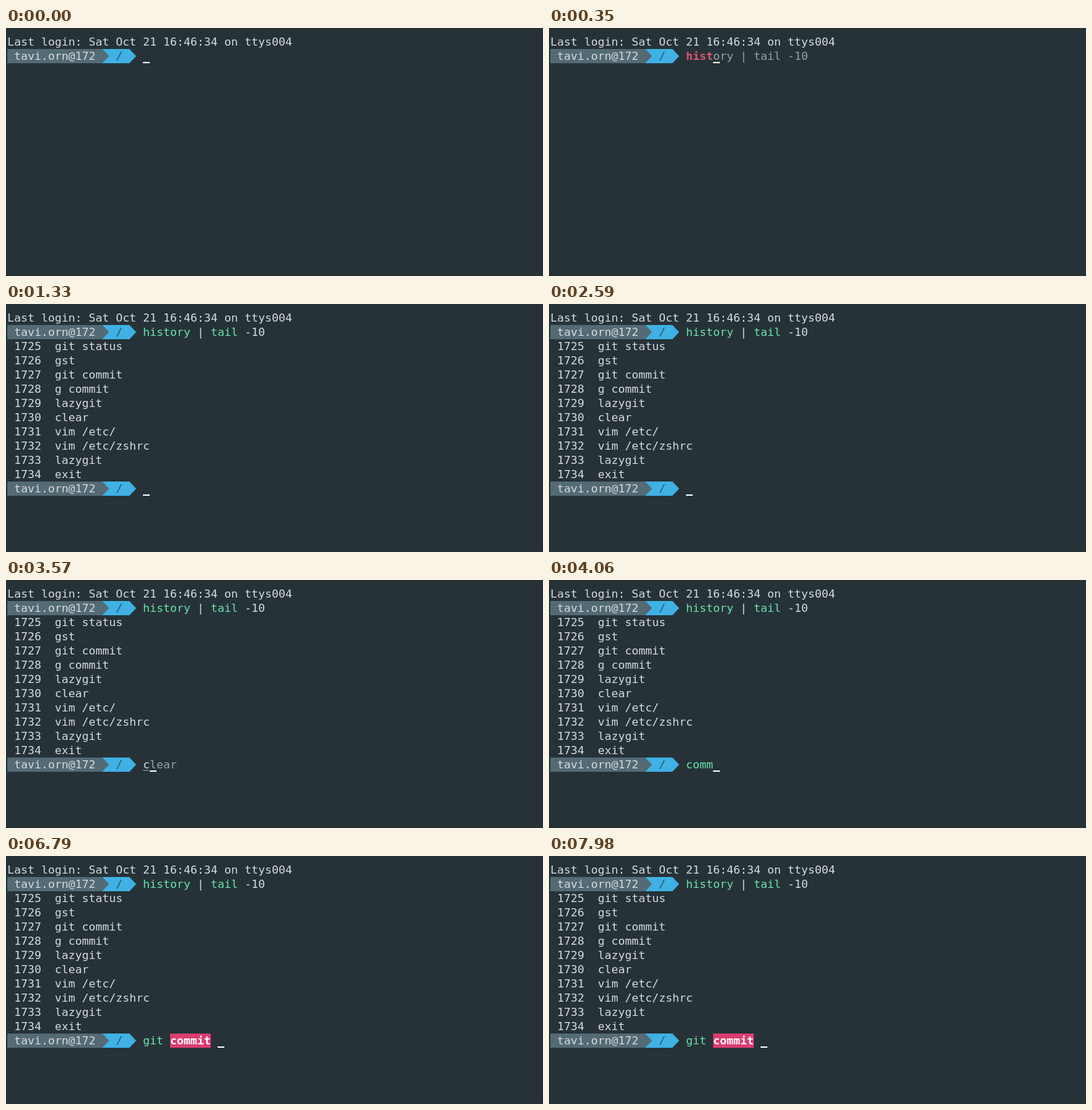
Recreate the animation shown at these times as an HTML page. Size 792x366 px, loop 8 s.

```html
<!DOCTYPE html>
<html lang="en">
<head>
<meta charset="utf-8">
<title>Terminal history search</title>
<style>
  html, body { margin: 0; width: 100%; height: 100%; overflow: hidden; background: #10181b; }
  svg { display: block; width: 792px; height: 366px; background: #263238; border-radius: 0 0 4px 4px; }
  text { font: 16.61px "DejaVu Sans Mono", monospace; white-space: pre; fill: #d5dcdf; }
  .command { fill: #6be3ab; }
  .unknown { fill: #e0566c; font-weight: bold; }
  .hint { fill: #98a3a8; }
  .match { fill: #fff; font-weight: bold; }
  .path { fill: #2d5368; }
</style>
</head>
<body>
<svg viewBox="0 0 792 366"><g id="screen"></g><g id="input"></g></svg>
<script>
const LOOP = 8000, CELL = 10, LINE = 21, INPUT_COL = 20;
const colX = col => 2 + col * CELL;
const rowY = row => 10 + row * LINE;

const rect = (x, y, w, h, fill) =>
  `<rect x="${x}" y="${y}" width="${w}" height="${h}" fill="${fill}"/>`;
const text = (col, row, string, style = "plain") =>
  `<text class="${style}" x="${colX(col)}" y="${rowY(row) + 16}">${string}</text>`;

function prompt(row) {
  const top = rowY(row), mid = top + LINE / 2, bottom = top + LINE;
  const arrow = (left, right, fill) =>
    `<path fill="${fill}" d="M${left} ${top}H${right}L${right + 10} ${mid}L${right} ${bottom}H${left}Z"/>`;
  return arrow(140, 182, "#3fb1e5") + arrow(2, 142, "#546a74") +
    text(1, row, "tavi.orn@172") + text(16, row, "/", "path");
}

// Draws [style, string] spans one after another from the input column.
function commandLine(row, spans) {
  let col = INPUT_COL, out = "";
  for (const [style, string] of spans) {
    const x = colX(col), width = string.length * CELL;
    if (style === "match") out += rect(x, rowY(row), width, LINE, "#dc3c70");
    if (style === "prefix") out += rect(x, rowY(row) + 18.5, width - 1, 1, "#98a3a8");
    out += text(col, row, string, style);
    col += string.length;
  }
  return out;
}

function cursor(row, spans) {
  const typed = spans.filter(([style]) => style !== "hint")
    .reduce((sum, [, string]) => sum + string.length, 0);
  return rect(colX(INPUT_COL + typed), rowY(row) + 19, CELL, 2, "#f4f7f8");
}

const tailCommand = [["command", "history"], ["plain", " | "], ["command", "tail"], ["plain", " -10"]];
const output = ["git status", "gst", "git commit", "g commit", "lazygit", "clear",
  "vim /etc/", "vim /etc/zshrc", "lazygit", "exit"];

const suggest = (style, typed, full) => [[style, typed], ["hint", full.slice(typed.length)]];
const tailHint = (style, typed) => suggest(style, typed, "history | tail -10");

const OUTPUT_TIME = 1260;
const steps = [
  [0, []],
  [70, tailHint("prefix", "h")],
  [140, tailHint("unknown", "hi")],
  [210, tailHint("unknown", "his")],
  [350, tailHint("unknown", "hist")],
  [420, tailHint("unknown", "histo")],
  [770, tailCommand],
  [OUTPUT_TIME, []],
  [3570, suggest("prefix", "c", "clear")],
  [3710, suggest("prefix", "co", "code /etc/profile")],
  [3850, [["unknown", "com"]]],
  [3990, [["command", "comm"]]],
  [4200, [["unknown", "commi"]]],
  [4340, [["unknown", "commit"]]],
  [5180, [["command", "g"], ["plain", " "], ["match", "commit"]]],
  [6790, [["command", "git"], ["plain", " "], ["match", "commit"], ["plain", " "]]],
];

const login = text(0, 0, "Last login: Sat Oct 21 16:46:34 on ttys004");
const before = login + prompt(1);
const after = before + commandLine(1, tailCommand) +
  output.map((line, i) => text(0, i + 2, ` ${1725 + i}  ${line}`)).join("") + prompt(12);

const screen = document.getElementById("screen");
const input = document.getElementById("input");
let shown;

function draw(now) {
  const time = now % LOOP;
  const step = steps.findLast(([start]) => start <= time);
  if (step !== shown) {
    shown = step;
    const [start, spans] = step;
    const finished = start >= OUTPUT_TIME, row = finished ? 12 : 1;
    screen.innerHTML = finished ? after : before;
    input.innerHTML = commandLine(row, spans) + cursor(row, spans);
  }
  requestAnimationFrame(draw);
}

const origin = performance.now();
const begin = () => draw(Math.max(0, performance.now() - origin));
draw = (render => () => render(Math.max(0, performance.now() - origin)))(draw);
begin();
</script>
</body>
</html>
```
